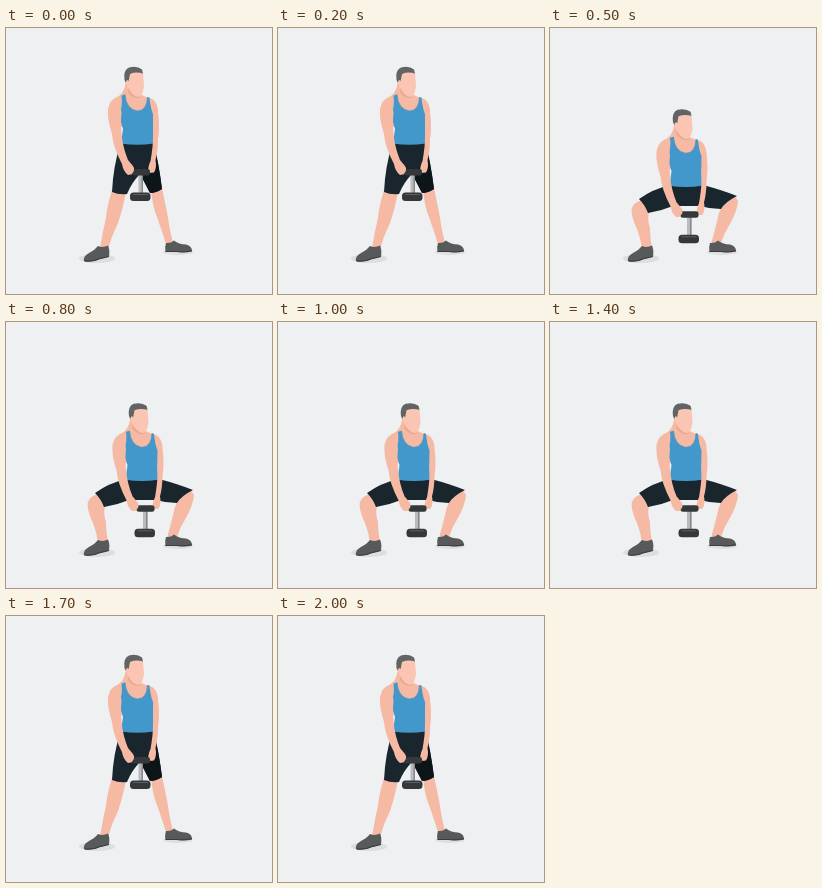
These frames come from a looping animation (266x266 px, 2100 ms). An HTML page:

```html
<!DOCTYPE html>
<html lang="en">
<head>
<meta charset="utf-8">
<title>Dumbbell squat</title>
<style>
html, body { margin: 0; height: 100%; overflow: hidden; background: #eef0f2; }
svg { display: block; width: 100%; height: 100%; }
.skin { fill: #f5b9a4; }
.shade { fill: #eaa892; }
.face { fill: #fac6b3; }
.cloth { fill: #1a262d; }
.dark { fill: #0d1519; }
.blue { fill: #4298cb; }
.trim { fill: none; stroke: #5a93b4; stroke-width: .8; }
.hair { fill: #626365; }
.iron { fill: #34383a; }
.shoe { fill: #58595b; }
.sole { fill: none; stroke: #3c3d3f; stroke-width: 1.2; }
.shadow { fill: #dcdee0; }
</style>
</head>
<body>
<svg viewBox="0 0 266 266">
  <ellipse class="shadow" cx="91" cy="230.500" rx="18" ry="4.500"/>
  <ellipse class="shadow" cx="172" cy="224" rx="15" ry="3"/>

  <g id="stand">
    <path class="skin" d="M106 162 Q101 178 100 190 Q96 207 94 221 L102 221 Q106 207 112 195 Q117 181 120 163Z"/>
    <path class="skin" d="M145 160 Q146 177 151 189 Q156 203 160 216 L167 215 Q163 200 161.500 187 Q159 175 156 160Z"/>
    <path class="cloth" d="M115 113 L147 113 Q152 130 156 161 Q150 165 144 165 L134 146 Q126 154 121 166 Q113 167 106 164 Q107 139 115 113Z"/>
    <path class="dark" d="M147 114 Q153 136 156 161 Q150 165 144 165 L136 149 Q146 137 147 114Z"/>
  </g>

  <g id="squat">
    <path class="skin" d="M97 171 Q83 173 81.500 182 Q82 191 87 201 Q91 211 92 221 L102 221 Q100 209 100 200 Q97 192 99 184Z"/>
    <path class="skin" d="M170 166 Q185 165 188 173 Q187 183 181 194 Q174 205 170 217 L161 216 Q165 202 167 193 Q168 186 171 180Z"/>
    <path class="cloth" d="M120 157 Q103 161 89 171 Q95 177 98 185 Q111 183 123 178 L150 178 Q160 181 171 181 Q175 174 187 168 Q172 162 153 157Z"/>
  </g>

  <path class="shoe" d="M92 218 Q97 220 102 217.500 Q104 222 103 228.500 L95 230.500 Q87 235 78 233 Q77 228 83 225 Q89 222 92 218Z"/>
  <path class="sole" d="M78.500 232.800 Q87 234 95 230.300 L103 228.500"/>
  <path class="shoe" d="M160 215 Q165 215.500 168 212.500 Q173 216.500 180 216.500 Q186 218 186 223 Q179 225 171 224 L159.500 224 Q158.500 219 160 215Z"/>
  <path class="sole" d="M159.500 223.500 L171 223.500 Q179 224.500 186 222.800"/>

  <g id="upper">
    <path class="skin" d="M120 54 L134 62 L134 66 Q139 69 146 71 Q152 75 152 87 L147 99 L112 99 L103 86 Q102 74 109 70 Q118 67 120 54Z"/>
    <path class="shade" d="M122 59 Q126 67 134 67 L134 70 Q125 70 122 64Z"/>
    <path class="face" d="M121 45 Q129 42 137 45 L138 58 Q137 68 132 69 Q126 68 121 58Z"/>
    <path class="hair" d="M118.500 52 Q117 42 123 39.500 Q131 37.500 136 41.500 L137 45.500 Q130 43.500 124 46 L122.500 54 L120 55Z"/>
    <ellipse class="face" cx="121.500" cy="54.500" rx="1.500" ry="2.600"/>
    <path class="blue" d="M115.500 67.500 L119 66.500 Q120 81 131 83 Q141 83 141.500 69 L143.500 69.500 Q144 79 147.500 84 L147 101 L147.500 115.500 Q131 118 115 115.500 L117 101 L113 87 Q117 78 115.500 67.500Z"/>
    <path class="trim" d="M119 66.500 Q120 81 131 83 Q141 83 141.500 69"/>
    <path class="skin" d="M108 71 Q115 74 115.500 85 Q114 95 115.500 106 Q117 120 122 132 L127 138 Q129 142 127 146 L122 147 Q117 143 116 136 Q107 119 106 106 Q101 91 102 81 Q104 73 108 71Z"/>
    <path class="skin" d="M145.500 71 Q152 74 152 85 Q154 98 152 111 Q152 123 149.500 132 Q151 140 148 144.500 L143 145 Q141 140 144.500 133 Q147 119 147 109 L147 86 Q143.500 78 145.500 71Z"/>
    <rect x="132.500" y="146" width="4.500" height="20" fill="#b9bcbe"/>
    <rect x="135.500" y="146" width="1.500" height="20" fill="#858a8d"/>
    <rect class="iron" x="126" y="141" width="18" height="6.500" rx="2.500"/>
    <rect class="iron" x="124" y="164.500" width="20.500" height="8.500" rx="3.500"/>
    <path d="M127 166.500 H142" stroke="#5a6063" stroke-width="1"/>
    <path class="skin" d="M121 138 Q126 137 128 140 Q128.500 144 125 146 L121 145Z"/>
  </g>
</svg>
<script>
const [stand, squat, upper] = ['stand', 'squat', 'upper'].map(id => document.getElementById(id));

function draw(now) {
  const t = now % 2100;
  const low = t >= 500 && t < 1500;
  stand.style.display = low ? 'none' : '';
  squat.style.display = low ? '' : 'none';
  upper.setAttribute('transform', low ? 'translate(4.5 42.3)' : '');
  requestAnimationFrame(draw);
}
draw(0);
</script>
</body>
</html>
```
